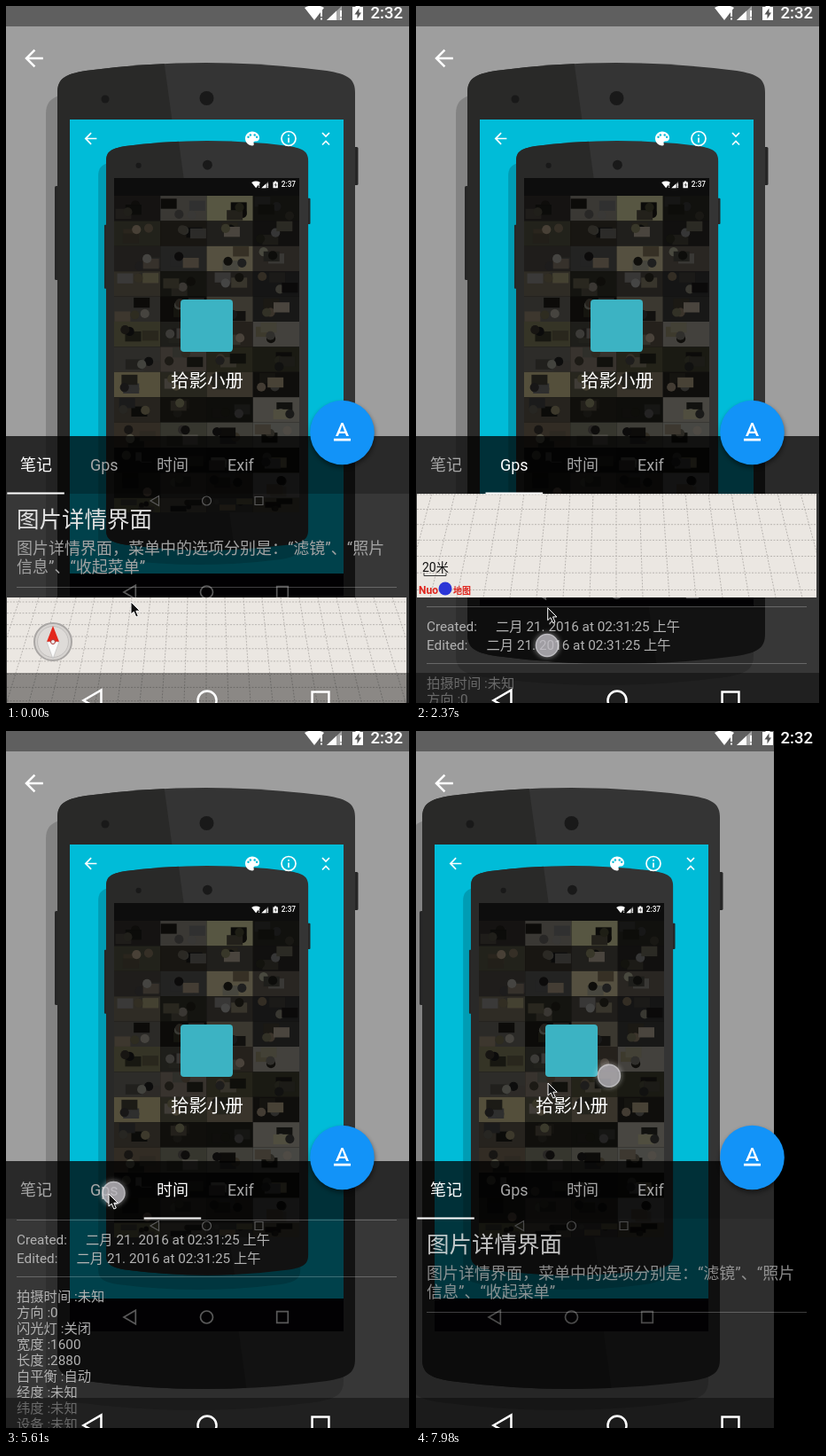
Write an HTML page that moves like this. It is 456 px wide and 786 px high and loops after 8000 ms.

```html
<!DOCTYPE html>
<html lang="zh-CN">
<head>
<meta charset="utf-8">
<title>Photo details</title>
<style>
html, body { margin: 0; width: 100%; height: 100%; overflow: hidden; background: #000; }
svg { display: block; width: 100vw; height: 100vh; }
text { font-family: Roboto, "Noto Sans CJK SC", "Noto Sans CJK", sans-serif; white-space: pre; }
.mid { font-family: "Noto Sans CJK TC", "Noto Sans CJK", sans-serif; }
.line { fill: none; stroke: #fff; }
</style>
</head>
<body>
<svg id="stage" viewBox="0 0 456 786" preserveAspectRatio="none"></svg>
<script>
const LOOP = 8000, STEP = 147.7;

// Drawing helpers
const rect = (x, y, w, h, fill, more = '') =>
  `<rect x="${x}" y="${y}" width="${w}" height="${h}" fill="${fill}" ${more}/>`;
const disc = (x, y, r, fill, more = '') =>
  `<circle cx="${x}" cy="${y}" r="${r}" fill="${fill}" ${more}/>`;
const path = (d, fill, more = '') => `<path d="${d}" fill="${fill}" ${more}/>`;
const line = (d, w) => `<path class="line" d="${d}" stroke-width="${w}"/>`;
const text = (x, y, size, fill, str, more = '') =>
  `<text x="${x}" y="${y}" font-size="${size}" fill="${fill}" ${more}>${str}</text>`;
const group = (x, y, scale, body) => `<g transform="translate(${x} ${y}) scale(${scale})">${body}</g>`;

const arrow = path('M8 -1H-4.200L1.400 -6.600L0 -8L-8 0L0 8L1.400 6.600L-4.200 1H8Z', '#fff');
const letter = path(`M-7 5v2H7V5ZM-2.500 .8h5l.9 2.200h2.100L.75 -8h-1.500L-5.500 3h2.100Z
  M0 -6L1.870 -1H-1.870Z`, '#fff', 'fill-rule="evenodd"');

function navKeys(left, mid, right, y, s, w) {
  return line(`M${left - s} ${y}L${left + s * .9} ${y - s * 1.1}V${y + s * 1.1}Z
    M${right - s * .9} ${y - s * .9}h${s * 1.8}v${s * 1.8}h${-s * 1.8}Z
    M${mid - s} ${y}a${s} ${s} 0 1 0 ${2 * s} 0a${s} ${s} 0 1 0 ${-2 * s} 0Z`, w);
}

function statusIcons(clock) {
  const alert = x => path(`M${x} 5h2v7h-2zM${x} 13.500h2v2h-2z`, '#fff');
  return path('M337 2Q348 -4 359 2L348 16Z', '#fff') + alert(355) +
    path('M362 16L379 0V16Z', '#fff', 'opacity=".45"') +
    path('M362 16L373 5.500V16Z', '#fff') + alert(377) +
    path('M391 1h3.500v-2h5v2H403V16H391Z', '#fff') +
    path('M398.500 2.500L393.500 9.500h3V14.500L401 7.500h-2.500Z', '#555') +
    text(448, 14, 18.5, '#fff', clock, 'text-anchor="end" font-weight="500"');
}

const BODY = `M58 98C58 82 66 77 90 73Q226 55 362 73C386 77 394 82 394 98V708
  C394 724 386 729 362 733Q226 751 90 733C66 729 58 724 58 708Z`;

function phone() {
  return path(BODY, '#000', 'opacity=".17" transform="translate(-13 24)"') +
    rect(55, 203, 5, 106, '#262626', 'rx="1.500"') + rect(392, 159, 5.5, 43, '#262626', 'rx="1.500"') +
    path(BODY, '#343434') +
    path('M0 60H178L272 745H0Z', '#292928', 'clip-path="url(#body)"') +
    disc(226.5, 104, 8, '#191919') + disc(112, 105, 4.5, '#191919');
}

// Dim thumbnails: each cell gets a ground and a few random patches
function mosaic() {
  let seed = 11, out = '';
  const rnd = () => (seed = seed * 16807 % 2147483647) / 2147483647;
  const tone = () => `hsl(${30 + rnd() * 30} ${rnd() * 18}% ${4 + 26 * rnd() ** 1.7}%)`;
  for (let y = 214; y < 571; y += 28.4) for (let x = 122; x < 330; x += 52.25) {
    const h = Math.min(28.4, 571 - y);
    out += rect(x, y, 52.25, h, tone());
    for (let i = 0; i < 4; i++) {
      const px = x + rnd() * 34, py = y + rnd() * h * .6;
      out += i % 2 ? disc(px + 8, py + h * .2, h * .18, tone()) : rect(px, py, 18, h * .4, tone());
    }
  }
  return out;
}

function photo() {
  return rect(0, 0, 455, 786, '#9e9e9e') + phone() +
    rect(72, 128, 309, 512, '#00bcd8') + rect(72, 640, 309, 37, '#060309') +
    navKeys(140, 226.5, 312, 661, 7, 1.7) +
    group(73.6, 108.4, '.679 .681', phone()) +
    group(95.5, 149.5, .86, arrow) +
    path(`M278 141.500c-5 0-8 4-8 8s3.500 8 8 8c2 0 2-1.500 1.500-3s1-2 2.500-2
      c3 0 4-2 4-4c0-4-4-7-8-7Z`, '#fff') +
    [-2, -1, 1, 2].map(i => disc(278.3 + i * 2.4, 143.3 + Math.abs(i) * 2.2, 1.2, '#00bcd8')).join('') +
    line('M311 149.500a8 8 0 1 0 16 0a8 8 0 1 0 -16 0ZM319 148.500V154M319 145V146.800', 1.7) +
    line('M357 143l4 4l4 -4M357 156.500l4 -4l4 4', 1.7) +
    rect(122, 194, 209, 377, '#0d0d0d') + mosaic() +
    group(125.5, 198, .45, statusIcons('2:37')) +
    navKeys(168, 226.5, 285.5, 558, 5, 1.2) +
    rect(197, 331, 59, 59, '#3cb3c3', 'rx="4"') +
    text(227, 430, 20.5, '#fff', '拾影小册', 'text-anchor="middle"');
}

function map() {
  let grid = '';
  for (let y = 5; y < 265; y += 12.5 + 7.5 * y / 265) grid += `M1 ${667 + y}H452`;
  for (let k = -12; k <= 12; k++) grid += `M${226 + k * 21} 667L${226 + k * 30} 932`;
  return `<g id="map" clip-path="url(#mapBox)">` + rect(1, 667, 451, 265, '#ebe7e2') +
    path(grid, 'none', 'stroke="#b9b5b1" stroke-dasharray="2 1.500"') +
    disc(53, 717, 21, '#d6d3d0', 'stroke="#a9a6a4" stroke-width="2"') +
    disc(53, 717, 17.5, '#dedbd8', 'stroke="#c2bfbd"') +
    path('M53 699L60 717H46Z', '#e3271b') +
    path('M53 736L60 717H46Z', '#fafafa', 'stroke="#bbb" stroke-width=".6"') +
    disc(53, 717, 2.5, '#eee', 'stroke="#a33"') +
    text(7, 903, 14, '#111', '20米') + path('M9 904.500v3H34v-3', 'none', 'stroke="#333"') +
    text(3, 928, 12, '#e0251d', 'Nuo', 'font-weight="700"') +
    disc(33, 922, 7.5, '#2b35d6') +
    text(42, 928, 10, '#e0251d', '地图', 'font-weight="700"') + '</g>';
}

function content() {
  const exif = ['拍摄时间 :未知', '方向 :0', '闪光灯 :关闭', '宽度 :1600', '长度 :2880', '白平衡 :自动',
    ...'经度 纬度 设备 型号 光圈 曝光时间 焦距 感光度'.split(' ').map(s => s + ' :未知')];
  const rule = y => rect(12, y, 429, 1, '#fff', 'opacity=".24"');
  const row = (x, y, s) => text(x, y, 15.3, '#b2b2b2', s);
  const note = (y, s) => text(12, y, 18, '#a2a2a2', s.replace(/[，：]/g, '<tspan class="mid">$&</tspan>'));
  const stamp = (y, label, x) => row(12, y, label) + row(x, y, '二月 21. 2016 at 02:31:25 上午');
  return `<g id="words">` + text(12, 588, 25.5, '#e2e2e2', '图片详情界面') +
    note(618, '图片详情界面，菜单中的选项分别是：“滤镜”、“照片') +
    note(639, '信息”、“收起菜单”') + '</g>' +
    rule(655) + map() + rule(942) +
    stamp(969.5, 'Created:', 90) + stamp(990.5, 'Edited:', 79.5) +
    rule(1006) + exif.map((s, i) => row(12, 1033.5 + i * 18, s)).join('');
}

const TABS = [['笔记', 16], ['Gps', 95], ['时间', 170], ['Exif', 250]];
const stage = document.getElementById('stage');
stage.innerHTML = `<defs>
  <clipPath id="body"><path d="${BODY}"/></clipPath>
  <clipPath id="mapBox">${rect(1, 667, 451, 265, '#fff')}</clipPath>
  <clipPath id="pane">${rect(0, 550, 456, 236, '#fff')}</clipPath>
  <filter id="soft" x="-30%" y="-30%" width="160%" height="160%"><feGaussianBlur stdDeviation="2.500"/></filter>
  </defs>` + rect(0, 0, 456, 786, '#000') +
  `<g id="photo">${photo()}</g>` +
  rect(0, 0, 456, 23, '#000', 'opacity=".4"') + statusIcons('2:32') +
  group(31.5, 59, 1.29, arrow) +
  rect(0, 485, 456, 65, '#000', 'opacity=".74"') +
  rect(0, 550, 456, 236, '#000', 'id="shade"') +
  `<g clip-path="url(#pane)"><g id="list">${content()}</g></g>` +
  TABS.map(([s, x]) => text(x, 524, 18, '#fff', s, 'class="tab"')).join('') +
  rect(0, 548.5, 64.5, 2, '#fff', 'id="bar"') +
  rect(0, 752, 456, 34, '#000', 'opacity=".41"') + navKeys(98, 227, 355, 783, 10.5, 2.5) +
  disc(380, 484, 36.5, '#000', 'opacity=".45" filter="url(#soft)"') + disc(379.5, 481, 36.3, '#1293f8') +
  group(379.5, 481, 1.36, letter) +
  `<g id="touch">${disc(0, 0, 15, '#fff', 'opacity=".3" filter="url(#soft)"')}` +
  disc(0, 0, 12.5, '#b9b6bd', 'opacity=".75" stroke="#e4e2e8" stroke-width="1.500"') + '</g>' +
  path('M0 0V14L3.200 11L5.800 17L8.300 16L5.800 10.200H10.200Z', '#111', 'id="cursor" stroke="#fff"');

// Motion
const part = (t, a, b) => Math.min(1, Math.max(0, (t - a) / (b - a)));
const smooth = p => p * p * (3 - 2 * p);
const fling = (t, a, b) => 1 - (1 - part(t, a, b)) ** 2;
const glide = (t, a, b) => smooth(part(t, a, b));

// Scroll offset at which each tab's section reaches the top
const STOPS = [0, 117, 391, 471];

// Two flings and a drag down the page, then three tab taps back up
function scrollAt(t) {
  const [top, gps, time, end] = STOPS;
  return 223 * fling(t, 590, 1581) + 207 * fling(t, 2235, 3431) + (end - 430) * glide(t, 3830, 4050) +
    (time - end) * glide(t, 4580, 4870) + (gps - time) * glide(t, 5660, 6060) + (top - gps) * glide(t, 6430, 6800);
}

// Pointer stops [ms, x, y], eased in between
const POINTER = [[0, 141, 672], [590, 150, 697], [950, 160, 541], [2235, 148, 721], [2650, 151, 535],
  [3540, 155, 640], [3830, 155, 640], [4080, 161, 552], [4420, 186, 509], [4870, 186, 509],
  [5610, 116, 522], [6300, 34, 517], [6942, 226, 421], [7240, 236, 388], [7800, 232, 387], [7975, 149, 397]];
// Finger down and up
const PRESSES = [[590, 1080], [2210, 2700], [3780, 4230], [4480, 4640], [5580, 5770], [6400, 6560], [7660, 8120]];

function pointerAt(t) {
  const n = Math.max(1, POINTER.findIndex(k => k[0] >= t));
  const last = t >= POINTER[POINTER.length - 1][0] ? POINTER.length - 1 : n;
  const a = POINTER[last - 1], b = POINTER[last], p = glide(t, a[0], b[0]);
  return [a[1] + (b[1] - a[1]) * p, a[2] + (b[2] - a[2]) * p];
}

const $ = id => document.getElementById(id);
const move = (id, x, y) => $(id).setAttribute('transform', `translate(${x.toFixed(1)} ${y.toFixed(1)})`);
const tabs = [...document.querySelectorAll('.tab')];

function draw(ms) {
  // The screen updates in even steps
  const t = Math.floor((ms % LOOP + 7) / STEP) * STEP;
  const scroll = Math.round(scrollAt(t));
  const tab = STOPS.filter(s => s <= scroll).length - 1;
  const dx = Math.round(-51 * part(t, 7700, 7975) ** 2);
  const press = PRESSES.find(([down, up]) => t >= down && t < up);
  move('photo', dx, 0);
  move('list', 0, -scroll);
  move('bar', 1.3 + tab * 77.2, 0);
  move('cursor', ...pointerAt(t));
  move('touch', ...pointerAt(t - 130));
  $('touch').setAttribute('opacity', press ? Math.min(1, (press[1] - t) / 150) : 0);
  $('map').setAttribute('visibility', dx ? 'hidden' : 'visible');
  $('words').setAttribute('opacity', dx ? .85 : 1);
  $('shade').setAttribute('opacity', dx ? .71 : .65);
  tabs.forEach((el, i) => el.setAttribute('fill', i === tab ? '#fff' : '#a6a6a6'));
}

const start = performance.now();
function tick() {
  draw(performance.now() - start);
  requestAnimationFrame(tick);
}
tick();
</script>
</body>
</html>
```
